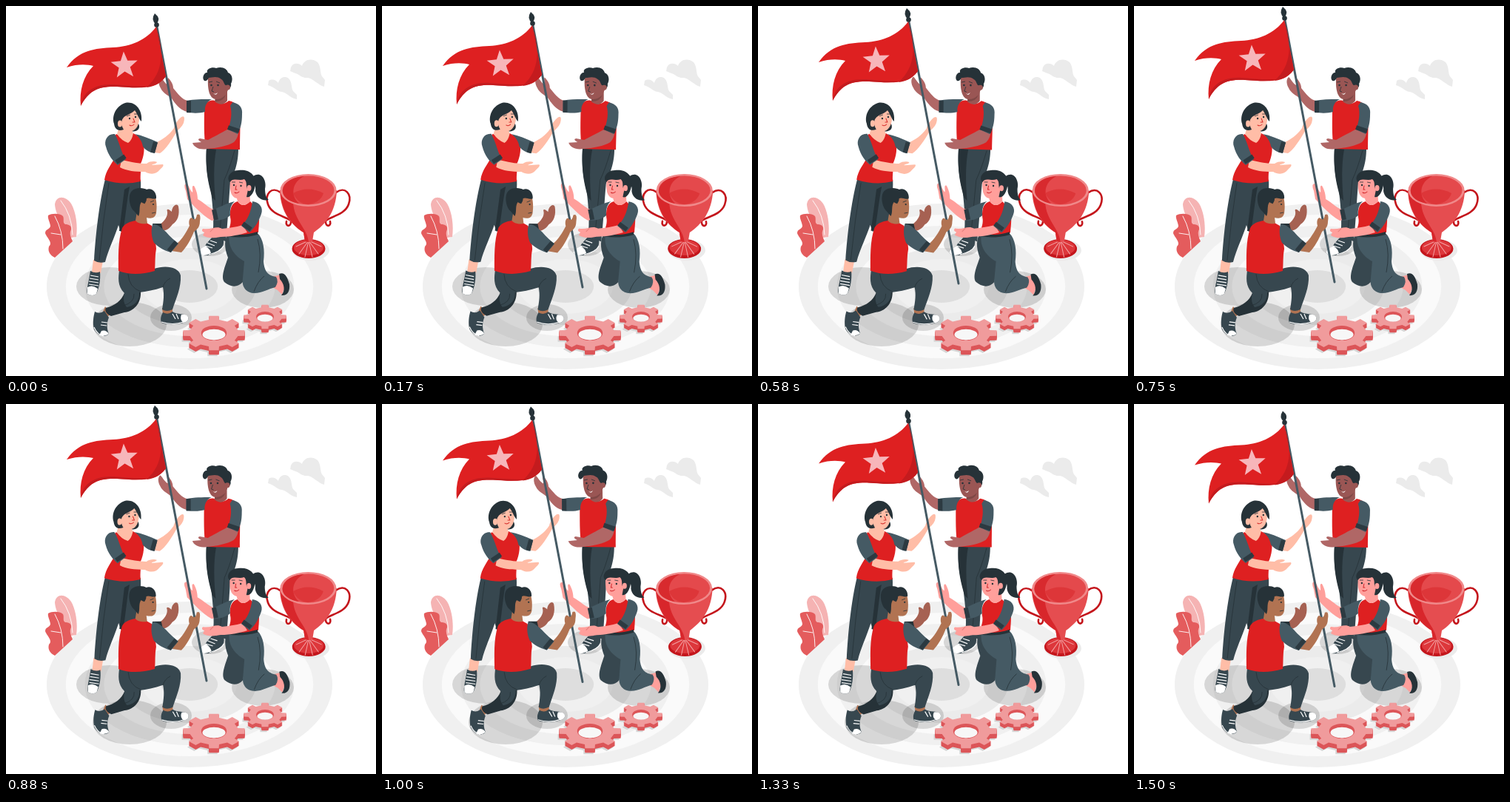
Write an HTML page that moves like this. It is 500 px wide and 500 px high and loops after 1540 ms.

```html
<!DOCTYPE html>
<html lang="en">
<head>
<meta charset="utf-8">
<title>Raising the flag</title>
<style>
html, body { margin: 0; width: 100%; height: 100%; overflow: hidden; background: #fff }
svg { display: block; width: 100%; height: 100% }
.red { fill: #de2021 } .deep { fill: #c41b1e }
.ink { fill: #263238 } .slate { fill: #37474f } .steel { fill: #455a64 }
.white { fill: #fff }
.line { fill: none; stroke-linecap: round; stroke-linejoin: round }
.lace { fill: none; stroke: #fff; stroke-width: 1.2 }
.seam { fill: none; stroke: #263238; stroke-width: .8 }
.cuff { fill: none; stroke: #2c3a41; stroke-width: 6 }
#backMan { --skin: #b06766 } #standing { --skin: #ffbda7 }
#kneeling { --skin: #ff9f9b } #frontMan { --skin: #b17352 }
.skin { fill: var(--skin) }
.shade { fill: #9a5654 }
</style>
</head>
<body>
<svg viewBox="0 0 500 500">
  <g id="rings"></g>
  <g fill="#000" fill-opacity=".14">
    <ellipse cx="140" cy="379" rx="45" ry="26"/>
    <ellipse cx="167" cy="430" rx="50" ry="30"/>
    <ellipse cx="223" cy="421" rx="28" ry="18"/>
    <ellipse cx="347" cy="383" rx="42" ry="25"/>
    <ellipse cx="276" cy="322" rx="25" ry="16"/>
  </g>
  <ellipse cx="412" cy="330" rx="25" ry="14" fill="#ebebeb"/>

  <g fill="#ebebeb">
    <path d="M385 83C387 77 395 76 400 81C402 73 413 69 421 76C426 82 424 90 427 95L431 100L430 109C422 107 415 98 408 97C400 98 396 92 391 91L384 88Z"/>
    <path d="M355 101C360 98 365 100 368 104C370 96 377 94 382 98C387 103 385 110 388 115L393 120V126C385 125 379 117 373 116C367 116 364 110 354 107Z"/>
  </g>

  <path fill="#f5b3b3" d="M66 268C68 256 80 256 88 267C95 279 97 298 95 312L82 314C80 295 67 285 66 268Z"/>
  <path fill="#e45c5d" d="M66 340C60 337 56 332 58 325C64 320 55 313 53 307C53 301 60 302 60 297C59 291 56 287 57 283C62 280 73 280 77 284C79 288 76 293 80 295C85 295 89 297 88 302C85 308 88 313 90 318Z"/>
  <path class="line" stroke="#fff" stroke-width=".9" d="M74 263Q89 282 90 309M66 284Q77 304 77 328M61 307L74 309"/>

  <g id="gears"></g>

  <g id="trophy">
    <g class="line" stroke="#c4161c" stroke-width="2.600">
      <path d="M446 252C458 243 468 254 463 268C458 282 440 284 432 290C431 299 440 299 438 291"/>
      <path d="M371 252C359 243 349 254 354 268C359 282 377 284 385 290C386 299 377 299 379 291"/>
    </g>
    <ellipse cx="409" cy="328" rx="22.500" ry="13" fill="#c4161c"/>
    <ellipse cx="409" cy="326.500" rx="20" ry="10.500" fill="#dd373b"/>
    <path class="line" stroke="#f3a3a4" d="M409 317L392 325M409 317L396 335M409 317L404 339M409 317L414 339M409 317L422 335M409 317L426 325"/>
    <path fill="#e54d50" d="M370 249C371 280 386 296 402 306L404 318Q409 321 414 318L416 306C432 295 446 278 447 249Z"/>
    <path fill="#d8262b" d="M371 253C373 281 388 297 402 306L404 318L409 319C407 300 389 290 388 265Z"/>
    <ellipse cx="408.500" cy="249" rx="38" ry="22" fill="#f0898a"/>
    <ellipse cx="408.500" cy="249" rx="35" ry="19.500" fill="#e4494c"/>
    <path fill="#d82a2e" d="M374 252C373 239 387 231 403 230C386 238 384 256 396 267C384 265 375 259 374 252Z"/>
    <path fill="#dd3639" d="M388 253Q408 242 429 253Q425 266 408 268Q394 267 388 253Z"/>
  </g>

  <g id="backMan">
    <path class="slate" d="M271 190L314 191C314 215 308 225 303 240C301 262 300 290 297 318L279 312C282 290 279 270 277 250C270 225 270 205 271 190Z"/>
    <path class="ink" d="M271 192L284 194C280 215 281 240 283 263L279 259C270 230 270 210 271 192Z"/>
    <path class="seam" d="M309 195Q302 220 295 235L289 305"/>
    <path class="slate" d="M279 312L294 316C295 326 290 330 284 332C276 338 265 339 260 334C259 330 267 328 271 321Z"/>
    <path class="white" d="M260 334C259 330 264 328 269 324Q276 328 277 334Q265 340 260 334Z"/>
    <path class="lace" d="M269 324L279 327M272 320L282 324M276 317L285 320M274 336Q290 332 294 324"/>
    <path class="red" d="M282 128C275 126 269 131 268 137C268 155 267 175 270 193L316 194C316 180 317 160 316 150C320 140 312 130 301 128Q292 136 282 128Z"/>
    <path class="skin" d="M246 128C238 127 232 118 226 111C226 105 222 100 219 97C217 99 220 104 219 107C214 104 211 97 209 96C205 99 206 106 209 111C212 118 220 121 224 125C231 136 238 142 246 143Z"/>
    <path class="steel" d="M278 126C265 126 255 126 244 128V144C255 145 262 145 269 143C268 136 271 129 278 126Z"/>
    <path class="cuff" d="M247 128V144"/>
    <path class="skin" d="M299 167C290 172 280 177 273 181L262 179Q257 180 264 184L252 185C254 191 262 195 272 193C285 192 300 189 308 184C314 178 314 172 314 168Z"/>
    <path class="steel" d="M306 130C316 132 320 138 319 146C319 158 317 165 313 173L300 167C304 157 306 144 303 135Z"/>
    <path class="cuff" d="M300 164L315 169"/>
    <path class="shade" d="M284 116L299 112V128Q292 137 282 129Z"/>
    <path fill="#7f4846" d="M283 125Q292 125 297 120Q294 129 283 129Z"/>
    <path class="shade" d="M273 98C272 115 276 126 284 126C294 126 299 118 301 110L300 92L274 93Z"/>
    <path class="ink" d="M268 101C264 97 268 89 272 90C270 84 280 82 284 84C292 81 299 85 300 90C306 92 307 100 304 105C305 109 302 112 300 113L297 107C295 107 294 100 291 99C285 94 278 97 274 97C272 101 270 102 268 101Z"/>
    <circle class="shade" cx="299.500" cy="110" r="3.500"/>
    <circle class="ink" cx="277.500" cy="107" r="1.300"/><circle class="ink" cx="286.500" cy="107" r="1.300"/>
    <path class="seam" d="M274 103L279 102M284 102L289 104M280 109L278 115L281 116"/>
    <path class="white" d="M280 118Q283 120 286 117Q284 122 280 118Z"/>
  </g>

  <g id="standing">
    <path class="skin" d="M118 343L131 344L128 361L116 360Z"/>
    <path class="slate" d="M114 358Q121 362 127 359C128 370 126 381 122 389Q117 393 110 389C108 384 112 372 114 358Z"/>
    <path class="white" d="M110 380Q117 376 124 382L122 389Q117 393 110 389Z"/>
    <path class="lace" d="M114 364L125 366M113 368L125 370M112 372L125 374M112 376L125 378"/>
    <path class="slate" d="M134 234L182 235C183 250 180 270 176 300L155 305L152 296C147 312 138 330 134 346Q125 348 119 344C121 310 126 265 134 234Z"/>
    <path class="ink" d="M160 248L167 244C163 265 161 290 158 304H153Z"/>
    <path class="seam" d="M139 239Q131 290 126 344"/>
    <path class="red" d="M149 173C144 178 143 190 147 205C142 215 135 222 133 235Q158 243 182 237C181 228 183 222 182 213C186 205 189 190 184 179L172 172Q164 181 149 173Z"/>
    <path class="skin" d="M204 184C212 180 220 175 227 165C228 160 232 154 237 150Q243 147 240 158C238 163 234 166 231 169C225 180 215 195 208 199L201 198Z"/>
    <path class="steel" d="M174 173C184 175 194 179 205 184L201 199C194 198 189 195 185 190C184 183 180 177 174 173Z"/>
    <path class="cuff" d="M202 184L198 198"/>
    <path class="skin" d="M156 208C170 211 180 213 190 213C195 209 202 210 204 211C203 214 198 213 197 215L212 214C214 216 210 219 208 221C203 228 195 228 188 224C175 224 163 223 154 218Z"/>
    <path class="steel" d="M147 173C137 172 132 182 135 190C138 202 145 210 151 215L162 207C156 200 154 185 147 173Z"/>
    <path class="cuff" d="M149 211L161 203"/>
    <path class="ink" d="M165 168C175 172 183 167 179 159L170 158Z"/>
    <path class="skin" d="M153 163L168 165L172 172Q170 182 165 185Q156 182 150 173Z"/>
    <path class="skin" d="M156 142C152 155 155 167 165 169C174 171 179 163 180 154L178 138Z"/>
    <path class="ink" d="M146 159C143 150 147 136 161 131C174 128 185 140 183 156C179 152 178 146 174 141C168 147 161 147 158 152C155 156 156 162 159 167C151 170 147 166 146 159Z"/>
    <ellipse class="skin" cx="154" cy="159" rx="3" ry="4.500"/>
    <circle class="ink" cx="167" cy="152" r="1.200"/><circle class="ink" cx="175" cy="150" r="1.200"/>
    <path class="seam" d="M163 149L168 147M173 146L178 146"/>
    <path class="line" stroke="#d8312f" d="M167 161Q170 163 173 160M172 152L174 157L171 157"/>
  </g>

  <g id="kneeling">
    <path class="ink" d="M334 230C345 222 353 236 350 247C350 255 352 260 355 262C345 264 338 258 337 250C338 243 335 240 333 238Z"/>
    <path class="skin" d="M360 366L371 363L377 378L373 390L367 384L360 380Z"/>
    <path class="slate" d="M299 309L320 312L327 330L320 373C312 382 302 379 295 373C290 366 296 352 300 340C294 325 296 315 299 309Z"/>
    <path class="steel" d="M302 309C318 313 330 311 340 307C348 315 350 330 348 345C349 356 352 364 365 366Q369 372 364 380C355 382 346 388 336 388C325 388 318 380 320 368L322 345C309 338 299 325 302 309Z"/>
    <path class="seam" d="M340 315Q346 335 341 360M349 365Q340 372 335 386"/>
    <path class="ink" d="M369 362C376 359 380 365 383 376C384 386 380 392 372 391C378 385 376 375 370 369Z"/>
    <path class="red" d="M313 264C306 266 302 272 303 285C305 293 302 300 299 308Q318 313 341 306C342 295 343 283 341 275L330 264Q320 274 313 264Z"/>
    <path class="ink" d="M299 307Q318 312 340 305V309Q318 315 299 311Z"/>
    <path class="skin" d="M281 275C275 274 267 265 259 261C259 253 256 246 254 243C250 242 253 249 252 252C248 248 247 242 244 240Q239 240 243 250L245 261C252 268 265 283 278 290L283 289Z"/>
    <path class="steel" d="M309 264C297 267 288 272 279 276L281 290C292 290 298 287 303 283C302 275 304 268 309 264Z"/>
    <path class="cuff" d="M281 275L284 289"/>
    <path class="skin" d="M320 296C310 299 300 300 292 301C284 296 278 303 266 301Q263 304 268 306L266 310C272 314 280 314 290 312C303 312 317 309 326 306Z"/>
    <path class="line" stroke="#e57f7c" d="M280 301L276 305"/>
    <path class="steel" d="M333 264C343 265 348 273 345 281C341 292 336 300 329 306L318 297C326 290 331 279 333 264Z"/>
    <path class="cuff" d="M320 294L331 302"/>
    <path class="skin" d="M303 234C302 248 303 258 312 260L313 264Q320 274 330 264L329 246L325 232Z"/>
    <path class="ink" d="M303 238C297 234 302 222 314 222C328 220 338 228 337 240C336 252 330 260 325 258L327 248C323 245 327 238 322 234C315 237 306 231 303 238Z"/>
    <ellipse class="skin" cx="328.500" cy="246" rx="3" ry="4"/>
    <circle class="ink" cx="308" cy="242" r="1.200"/><circle class="ink" cx="317.500" cy="243" r="1.200"/>
    <path class="seam" d="M305 238L310 238M315 238L320 239"/>
    <path class="line" stroke="#cf2429" d="M309 252Q312 254 315 251M311 243L310 248L312 248"/>
  </g>

  <g id="flag">
    <path class="line" stroke="#455a64" stroke-width="3" d="M203.500 26L271 382"/>
    <path class="ink" d="M201 10L205 14Q208 19 203 25Q195 19 201 10Z"/>
    <circle class="ink" cx="203.500" cy="25.500" r="3.300"/>
    <path class="red" d="M203 28C190 46 168 55 145 56C120 57 98 60 82 83C97 78 110 79 118 81C104 95 99 115 101 135C112 114 125 108 150 109C175 110 202 115 216 95Z"/>
    <path class="deep" d="M203 28C213 60 214 88 190 110C203 109 212 101 216 95Z"/>
    <path class="deep" d="M101 135C104 116 119 105 145 106C165 107 182 110 200 107C184 112 167 110 150 109C125 108 112 114 101 135Z"/>
    <path id="star" fill="#f7b6ba"/>
  </g>

  <g id="frontMan">
    <path fill="#a66152" d="M207 296C214 291 219 284 218 278C216 272 222 276 224 278C224 271 231 265 233 271C235 282 232 291 225 295C220 303 212 305 206 304Z"/>
    <path class="ink" d="M198 294L210 294L212 303L202 306Z"/>
    <path class="skin" d="M134 406L142 416L137 420L131 413Z"/>
    <path class="skin" d="M211 408L225 408V416L212 417Z"/>
    <path class="ink" d="M165 380L182 386C183 402 172 413 160 414L142 419C135 416 133 411 135 408C147 405 156 398 160 388Z"/>
    <path class="slate" d="M153 357C170 364 190 361 200 355C215 350 233 352 236 364C237 380 230 395 225 410Q217 414 211 410C213 398 214 390 212 380C200 384 190 386 180 387C181 399 172 406 163 407Q157 400 160 388C150 378 152 366 153 357Z"/>
    <path class="seam" d="M165 362Q166 380 182 386M212 380Q214 372 222 368M173 389Q174 401 158 405"/>
    <path class="slate" d="M212 414Q219 418 225 413C232 418 240 414 246 420Q248 426 240 428C228 431 218 431 210 428C208 422 210 418 212 414Z"/>
    <path class="white" d="M237 417Q243 416 246 420Q248 426 240 428Q234 424 237 417Z"/>
    <path class="lace" d="M225 416L229 423M230 416L233 423M210 427Q225 432 240 427"/>
    <path class="slate" d="M133 412L139 421C136 428 136 436 139 443C134 448 125 447 119 437C117 428 118 420 120 413Q126 417 133 412Z"/>
    <path class="white" d="M129 439Q135 437 139 443Q134 447 126 445Z"/>
    <path class="lace" d="M129 427L137 428M128 431L136 432M119 434Q123 444 132 446"/>
    <path class="red" d="M175 290C168 291 160 294 157 300C151 318 152 340 152 358Q174 366 201 358C202 348 201 338 203 328C202 316 200 305 197 297L188 292Z"/>
    <path class="skin" d="M232 320C238 315 244 305 248 297C246 290 249 284 252 287C255 290 257 288 258 282Q264 279 262 291C262 299 258 302 254 305C250 315 244 326 237 333L224 331Z"/>
    <path class="steel" d="M198 295C205 294 210 300 216 305C222 312 228 317 233 321L223 333C212 330 205 325 200 320C196 311 196 302 198 295Z"/>
    <path class="cuff" d="M230 319L220 331"/>
    <path class="skin" d="M184 258C192 258 198 258 201 255C204 264 204 272 203 280C201 288 195 287 190 286L191 294C185 295 178 294 175 290L177 278Z"/>
    <path class="ink" d="M173 277C167 272 164 256 170 250C176 244 187 246 190 248C197 245 204 252 203 260C198 262 194 258 190 260C190 264 188 266 187 268L183 265C179 270 182 278 179 284Z"/>
    <ellipse class="skin" cx="185" cy="271" rx="3.500" ry="4.500"/>
    <circle class="ink" cx="199" cy="268" r="1.100"/>
    <path class="seam" d="M195 265L200 263M197 280L202 279"/>
  </g>
</svg>
<script>
const PERIOD = 1540, TAU = Math.PI * 2;
const get = id => document.getElementById(id);
const polygon = points => 'M' + points.map(p => p.map(v => v.toFixed(1)).join(' ')).join('L') + 'Z';
const ellipse = (x, y, rx, ry, fill) => `<ellipse cx="${x}" cy="${y}" rx="${rx}" ry="${ry}" fill="${fill}"/>`;

get('rings').innerHTML = ['#f0f0f0', '#fafafa', '#f0f0f0', '#fafafa', '#ebebeb', '#f0f0f0', '#dedede']
  .map((fill, i) => ellipse(248, 379, 193 - 25.8 * i, 112 - 15 * i, fill)).join('');

get('star').setAttribute('d', polygon(Array.from({ length: 10 }, (_, i) => {
  const a = i * TAU / 10 - TAU / 4 - .06, r = i % 2 ? 8 : 19;
  return [160 + r * Math.cos(a), 80.5 + r * Math.sin(a)];
})));

function gear(cx, cy, rx, ry, depth) {
  const points = [];
  for (let i = 0; i < 8; i++)
    for (const [offset, r] of [[-.27, .79], [-.2, 1], [.2, 1], [.27, .79]]) {
      const a = (i + offset) * TAU / 8;
      points.push([cx + rx * r * Math.cos(a), cy + ry * r * Math.sin(a)]);
    }
  const outline = polygon(points);
  const layer = (x, y, fill) => `<path d="${outline}" transform="translate(${x} ${y})" fill="${fill}"/>`;
  let out = layer(-2, depth + 2, '#d6d6d6');
  for (let y = depth; y > 0; y--) out += layer(0, y, '#dc5558');
  return out + layer(0, 0, '#f09b9c')
    + ellipse(cx, cy, rx * .41, ry * .43, '#dc5558')
    + ellipse(cx, cy + depth * .35, rx * .37, ry * .31, '#f7f7f7');
}
get('gears').innerHTML = gear(281, 442, 42, 23.5, 6) + gear(350, 420, 29, 16.5, 5);

const pivots = {
  backMan: [272, 210], standing: [176, 260], kneeling: [314, 306],
  frontMan: [185, 345], trophy: [409, 284]
};

// Linear zigzag: 0 at the start, 1 after half a turn, back to 0.
const zigzag = turn => 1 - Math.abs(1 - 2 * (turn % 1));

function draw() {
  const turn = performance.now() / PERIOD;
  get('flag').setAttribute('transform', `translate(0 ${-9.3 * zigzag(turn)})`);
  const sway = 2 * zigzag(turn + .25) - 1;
  for (const [id, [x, y]] of Object.entries(pivots))
    get(id).setAttribute('transform', `rotate(${sway} ${x} ${y})`);
  requestAnimationFrame(draw);
}
draw();
</script>
</body>
</html>
```
